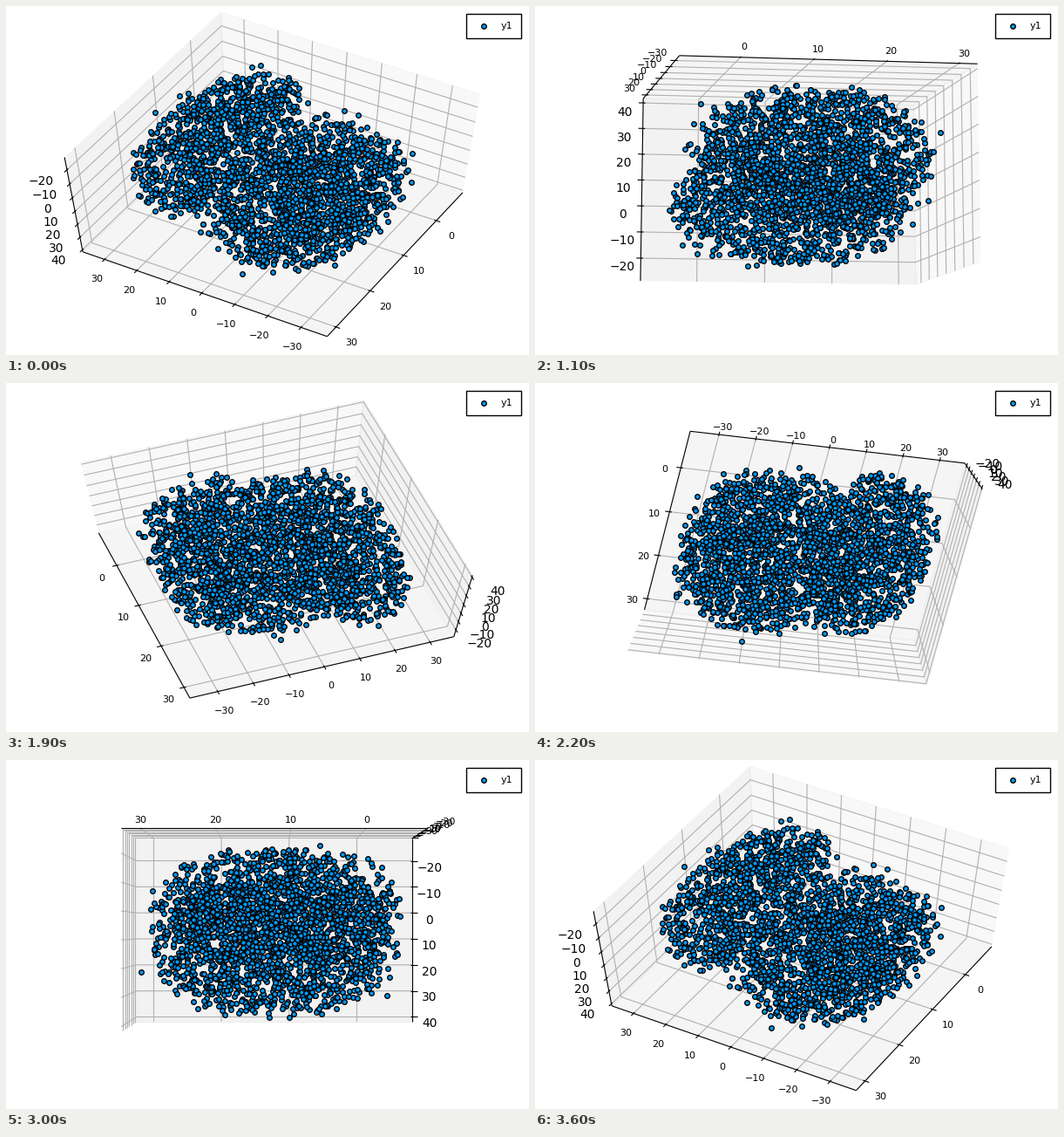
A matplotlib script for the animation above (3.7 s loop, 600 px wide and 400 px high).

```python
import numpy as np
import matplotlib.pyplot as plt
from matplotlib.animation import FuncAnimation
from matplotlib.collections import LineCollection
from matplotlib.patches import Polygon, Rectangle

W, H, DPI = 600, 400, 100
STEPS = 37
BLUE = (0, 0.6056, 0.9787)

# plot area with a 1 mm margin, and the screen centre of the cube
PAD = DPI / 25.4
AX_W, AX_H = W - 2 * PAD, H - 2 * PAD
CENTRE = np.array([PAD + AX_W * 0.095 / 0.185, PAD + AX_H * 0.09 / 0.185])
SCALE = np.array([AX_W, -AX_H]) / 0.185
DIST = 10

LIMITS = [(-7.42, 31.75), (-36.3, 35.3), (-27.23, 40.32)]
FLIPS = [(1, 0), (0, 1), (0, 2)]      # edge of each axis: side to flip, then run
TICK_DIR = [1, 0, 0]
PANE_GREY = [0.95, 0.90, 0.925]
FONT = [8, 8, 10]
DELTA = 1 / 12
EDGE = 0.5 + DELTA / 4
LABEL_GAP = 11.5 * 48 / (72 * (AX_W + AX_H) / DPI) * DELTA
LABEL_SHIFT = (0.5, 1.2)


def camera(step):
    """Right, up and towards-viewer vectors; both angles turn 10 degrees a step."""
    elev = np.deg2rad(-120 + 10 * step)
    azim = np.deg2rad(-210 + 10 * step)
    toward = np.array([np.cos(elev) * np.cos(azim),
                       np.cos(elev) * np.sin(azim), np.sin(elev)])
    right = np.array([-np.sin(azim), np.cos(azim), 0])
    return right, np.cross(toward, right), toward


def project(points, cam):
    right, up, toward = cam
    points = np.asarray(points, float)
    depth = DIST - points @ toward
    flat = np.stack([points @ right, points @ up], -1) / depth[..., None]
    return CENTRE + flat * SCALE, depth


def unit(axis, value):
    lo, hi = LIMITS[axis]
    return (value - lo) / (hi - lo) - 0.5


def tick_values(axis):
    lo, hi = LIMITS[axis]
    return range(int(np.ceil(lo / 10)) * 10, int(hi) + 1, 10)


def lobe(pts, centre, radii):
    """Rounded ellipsoid: below 1 inside, above 1 outside."""
    return (np.abs((pts - centre) / radii) ** 2.3).sum(axis=1) ** (1 / 2.3)


def make_cloud(count=2500, reach=0.4717):
    """Two overlapping lobes with a ragged rim, and one stray point."""
    rng = np.random.default_rng(7)
    pts = rng.uniform(-reach, reach, (20000, 3))
    size = np.minimum(lobe(pts, (0, 0.23, -0.15), (0.45, 0.24, 0.32)),
                      lobe(pts, (0, -0.13, 0.08), (0.44, 0.33, 0.38)))
    inside = pts[size < rng.normal(0.98, 0.05, len(pts))]
    return np.vstack([inside[:count], (reach, -0.138, 0.226)])


cloud = make_cloud()

fig = plt.figure(figsize=(W / DPI, H / DPI), dpi=DPI, facecolor="white")
ax = fig.add_axes([0, 0, 1, 1])
ax.set(xlim=(0, W), ylim=(H, 0))
ax.axis("off")

panes = []
for grey in PANE_GREY:
    colour = (grey, grey, grey, 0.5)
    panes.append(ax.add_patch(Polygon(np.zeros((4, 2)), closed=False, fc=colour,
                                      ec=colour, lw=1, zorder=1)))
grid = ax.add_collection(LineCollection([], colors="#b0b0b0", linewidths=0.8, zorder=2))
edges = ax.add_collection(LineCollection([], colors="black", linewidths=0.8, zorder=3))
labels = [[ax.text(0, 0, str(v).replace("-", "\u2212"), size=FONT[i],
                   ha="center", va="top", zorder=4) for v in tick_values(i)]
          for i in range(3)]
dot = dict(s=16, color=BLUE, edgecolors="black", linewidths=1)
dots = ax.scatter(cloud[:, 0], cloud[:, 1], zorder=5, **dot)

# legend
ax.add_patch(Rectangle((528, 9), 63, 28, fc="white", ec="black", lw=1, zorder=6))
ax.scatter([548], [23], zorder=7, **dot)
ax.text(574, 26.5, "y1", size=8, ha="center", va="baseline", zorder=7)


def moved(point, axis, value):
    point = point.copy()
    point[axis] = value
    return point


def draw(step):
    cam = camera(step)
    high = cam[2] < -1e-20            # the far side of each axis is its maximum
    back = np.where(high, EDGE, -EDGE)
    grid_lines, edge_lines = [], []

    for i in range(3):
        a, b = (i + 1) % 3, (i + 2) % 3
        corners = [moved(moved(back, a, p), b, q)
                   for p, q in ((-EDGE, -EDGE), (EDGE, -EDGE), (EDGE, EDGE), (-EDGE, EDGE))]
        panes[i].set_xy(project(corners, cam)[0])

        side, run = FLIPS[i]
        start = moved(back, side, -back[side])
        edge_lines.append([start, moved(start, run, -start[run])])

        t = TICK_DIR[i]
        tick = DELTA if high[t] else -DELTA
        for value, label in zip(tick_values(i), labels[i]):
            u = unit(i, value)
            bend = moved(back, i, u)
            grid_lines.append([moved(bend, a, -bend[a]), bend, moved(bend, b, -bend[b])])
            base = moved(start, i, u)
            edge_lines.append([moved(base, t, base[t] + 0.1 * tick),
                               moved(base, t, base[t] - 0.2 * tick)])
            spot = moved(base + np.sign(base) * LABEL_GAP, i, u)
            label.set_position(project(spot, cam)[0] + LABEL_SHIFT)

    grid.set_segments(list(project(grid_lines, cam)[0]))
    edges.set_segments(list(project(edge_lines, cam)[0]))
    xy, depth = project(cloud, cam)
    dots.set_offsets(xy[np.argsort(-depth)])
    return [*panes, grid, edges, dots]


anim = FuncAnimation(fig, draw, frames=STEPS, interval=100, repeat=True,
                     repeat_delay=0, init_func=lambda: draw(0))
plt.show()
```
